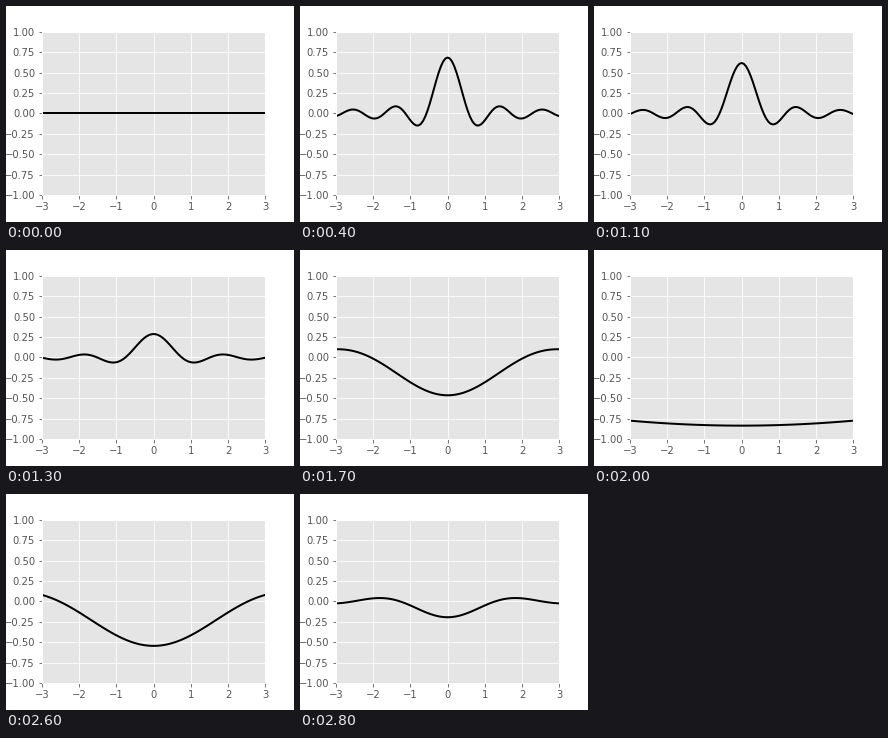
Recreate the animation shown at these times as a matplotlib script. Size 288x216 px, loop 2.9 s.

```python
import numpy as np
import matplotlib.pyplot as plt
from matplotlib.animation import FuncAnimation

FRAMES = 29
INTERVAL = 100

plt.style.use("ggplot")
plt.rcParams.update({
    "font.family": "DejaVu Sans",
    "font.size": 10,
    "figure.facecolor": "white",
})

fig = plt.figure(figsize=(4, 3), dpi=72)
fig.subplots_adjust(left=0.125, right=0.9, bottom=0.125, top=0.88)
ax = fig.add_subplot(xlim=(-3, 3), ylim=(-1, 1))
ax.set_xticks(np.arange(-3, 4))
ax.set_yticks(np.linspace(-1, 1, 9))

x = np.linspace(-3, 3, 101)
line, = ax.plot(x, np.zeros_like(x), color="black", lw=2)


def update(i):
    """Swing the height and the frequency of a sinc pulse together."""
    s = np.sin(2 * np.pi * i / FRAMES)
    line.set_ydata(0.9 * s * np.sinc((1 + s) * x))
    return line,


anim = FuncAnimation(fig, update, frames=FRAMES, interval=INTERVAL,
                     repeat=True, repeat_delay=0)
plt.show()
```
